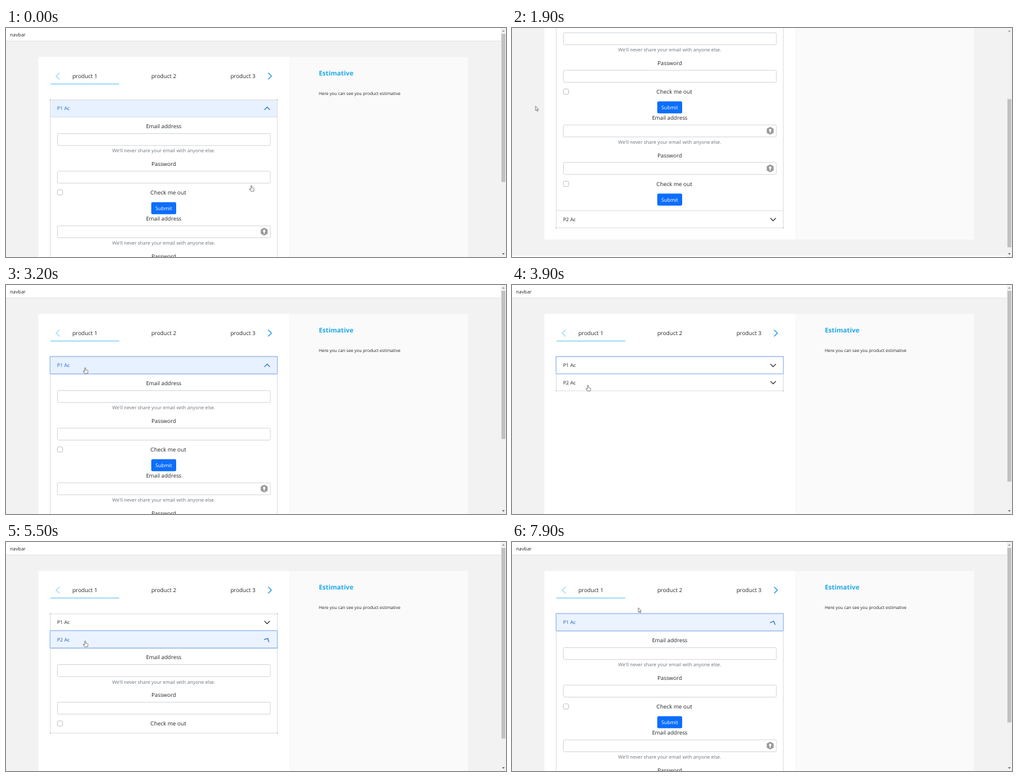
An HTML page with a canvas for the animation above (8000 ms loop, 764x352 px).

```html
<!DOCTYPE html>
<html lang="en">
<head>
<meta charset="utf-8">
<title>Product accordion</title>
<style>
html, body { margin: 0; width: 764px; height: 352px; overflow: hidden; background: #f2f2f2; }
canvas { display: block; }
</style>
</head>
<body>
<canvas id="stage" width="764" height="352"></canvas>
<script>
const ctx = document.getElementById('stage').getContext('2d');
const LOOP = 8000, STEP = 100, VIEW = 352;
const LEFT = 67.5, RIGHT = 414.5, MIDDLE = 241, TOP = 110, ROW = 26.4;
const BODY1 = 299.4, BODY2 = 158, FORM_GAP = 141.7;
const INK = '#212529', MUTED = '#6c757d', LINE = '#dfdfdf';

// Cursor tip: time, x, y
const cursorPath = [
  [500, 190, 153], [600, 164, 146], [1200, 30, 104], [1300, 30, 104], [1600, 36, 120],
  [1900, 36, 120], [2700, 39, 134], [3200, 121, 127], [3500, 121, 127], [3900, 116, 154],
  [4400, 115, 154], [5200, 115, 154], [5400, 121, 152], [6100, 121, 152], [6700, 243, 76],
  [7100, 243, 76], [7600, 180, 122], [7750, 180, 122], [7900, 193, 101]
];

const clamp = v => Math.min(1, Math.max(0, v));
const mix = (a, b, k) => a + (b - a) * k;
const smooth = p => p * p * (3 - 2 * p);
const easeOut = p => 1 - (1 - p) ** 3;

// CSS "ease": cubic-bezier(.25, .1, .25, 1)
function ease(p) {
  const bezier = (a, b, s) => 3 * a * s * (1 - s) ** 2 + 3 * b * s * s * (1 - s) + s ** 3;
  let low = 0, high = 1;
  for (let i = 0; i < 20; i++) {
    const mid = (low + high) / 2;
    if (bezier(.25, .25, mid) < p) low = mid; else high = mid;
  }
  return bezier(.1, 1, low);
}

const ramp = (t, start, duration, curve) => curve(clamp((t - start) / duration));
const mixColor = (a, b, k) => `rgb(${a.map((v, i) => Math.round(mix(v, b[i], k)))})`;

function rect(x, y, w, h, fill) {
  ctx.fillStyle = fill;
  ctx.fillRect(x, y, w, h);
}

function box(x, y, w, h, radius, fill, stroke) {
  ctx.beginPath();
  ctx.roundRect(x, y, w, h, radius);
  if (fill) { ctx.fillStyle = fill; ctx.fill(); }
  if (stroke) { ctx.strokeStyle = stroke; ctx.lineWidth = 1; ctx.stroke(); }
}

function text(str, x, y, size, color = INK, align = 'left', weight = 400) {
  ctx.font = `${weight} ${size}px "Open Sans", "Noto Sans", sans-serif`;
  ctx.textAlign = align;
  ctx.fillStyle = color;
  ctx.fillText(str, x, y + size * .36);
}

function polyline(points, stroke, width) {
  ctx.beginPath();
  points.forEach(([x, y]) => ctx.lineTo(x, y));
  ctx.strokeStyle = stroke;
  ctx.lineWidth = width;
  ctx.stroke();
}

function polygon(points, fill) {
  ctx.beginPath();
  points.forEach(([x, y]) => ctx.lineTo(x, y));
  ctx.closePath();
  ctx.fillStyle = fill;
  ctx.fill();
}

function at(x, y, angle, draw) {
  ctx.save();
  ctx.translate(x, y);
  ctx.rotate(angle);
  draw();
  ctx.restore();
}

function keyIcon(y) {
  at(394.5, y, 0, () => {
    polygon([[0, -6], [5.2, -3.2], [5.2, 3.2], [0, 6], [-5.2, 3.2], [-5.2, -3.2]], '#999');
    ctx.beginPath();
    ctx.arc(0, -1, 1.9, 0, 7);
    ctx.fillStyle = '#fff';
    ctx.fill();
    rect(-.7, 0, 1.4, 3.5, '#fff');
  });
}

function form(dy, withKeys) {
  const label = (str, y) => text(str, MIDDLE, y + dy, 8.35, INK, 'center');
  const field = y => {
    box(78.5, y - 9 + dy, 325.5, 18.4, 2, '#fff', '#d3d7db');
    if (withKeys) keyIcon(y + dy);
  };
  label('Email address', 151);
  field(171.3);
  text("We'll never share your email with anyone else.", MIDDLE, 188.7 + dy, 7.34, MUTED, 'center');
  label('Password', 209);
  field(229);
  box(78.5, 248.8 + dy, 8, 8, 2, '#fff', '#c4c4c4');
  text('Check me out', 248, 253 + dy, 8.5, INK, 'center');
  box(222, 267.7 + dy, 38, 18.6, 2, '#0d6efd');
  text('Submit', MIDDLE, 277.3 + dy, 7.7, '#fff', 'center');
}

function header(str, y, active) {
  const color = mixColor([33, 37, 41], [28, 105, 212], active);
  rect(LEFT, y, RIGHT - LEFT, ROW, mixColor([255, 255, 255], [231, 241, 255], active));
  text(str, 78, y + 13.4, 7.6, color);
  at(399, y + 13.6, -Math.PI * active, () => polyline([[-4.2, -2.2], [0, 2], [4.2, -2.2]], color, 1.1));
}

function accordionBody(y, height, draw) {
  if (height <= 0) return;
  ctx.save();
  ctx.beginPath();
  ctx.rect(LEFT, y, RIGHT - LEFT, height);
  ctx.clip();
  draw();
  ctx.restore();
  rect(LEFT, y, RIGHT - LEFT, 1, '#d3dce9');
}

function focusRing(y) {
  box(LEFT - .5, y - .5, RIGHT - LEFT + 1, ROW + 1, 1, null, 'rgba(13,110,253,.25)');
  box(LEFT, y, RIGHT - LEFT, ROW, 1, null, '#9dbff2');
}

function page(state) {
  const { open1, open2, active1, active2, focus, panelBottom, row2, bottom, height } = state;
  rect(0, 0, 756, height, '#f2f2f2');
  rect(0, 0, 756, 20, '#fff');
  rect(0, 19.5, 756, 1, '#e3e3e3');
  text('navbar', 6, 10.5, 7.4);

  rect(49.5, 44.5, 384, panelBottom - 44.5, '#fff');
  rect(433.5, 44.5, 272.5, panelBottom - 44.5, '#fafafa');
  text('Estimative', 478, 69.7, 10, '#1fa9ea', 'left', 700);
  text('Here you can see you product estimative', 478, 100.3, 6.58);

  polyline([[81.8, 69], [76.6, 74], [81.8, 79]], '#a3d9f5', 1.3);
  polyline([[400.5, 69], [405.7, 74], [400.5, 79]], '#2a9ce8', 1.3);
  [120.5, 241, 362].forEach((x, i) => text('product ' + (i + 1), x, 74.2, 8.5, INK, 'center'));
  rect(68, 85.5, 105, 1.2, '#6fcbee');

  header('P1 Ac', TOP, active1);
  accordionBody(TOP + ROW, BODY1 * open1, () => { form(0, false); form(FORM_GAP, true); });
  header('P2 Ac', row2, active2);
  accordionBody(row2 + ROW, BODY2 * open2, () => form(row2 + ROW - 136.6, false));
  rect(LEFT, row2 - .5, RIGHT - LEFT, 1, LINE);
  box(LEFT, TOP + .5, RIGHT - LEFT, bottom - TOP - .5, 1, null, LINE);
  for (const x of [LEFT, RIGHT]) for (const y of [TOP, bottom - .5]) rect(x - .5, y, 1, 1, '#777');
  if (focus) focusRing(focus === 1 ? TOP : row2);

  rect(0, height - 11, 756, 11, '#fff');
  text('footer', 6, height - 4.5, 7.4);
}

function scrollbar(scroll, height) {
  const track = 334, scale = track / height;
  rect(756, 0, 8, VIEW, '#f1f1f1');
  rect(757, 9 + scroll * scale, 6, VIEW * scale, '#c1c1c1');
  polygon([[758, 5.5], [760, 3.3], [762, 5.5]], '#8a8a8a');
  polygon([[758, 346.3], [760, 348.5], [762, 346.3]], '#505050');
}

function cursorAt(t) {
  if (t < 100) return { x: 375, y: 242, hand: true };
  if (t < 600) return null;
  const next = cursorPath.findIndex(key => key[0] >= t);
  const [t0, x0, y0] = cursorPath[next - 1], [t1, x1, y1] = cursorPath[next];
  const k = smooth((t - t0) / (t1 - t0));
  return { x: mix(x0, x1, k), y: mix(y0, y1, k) };
}

function drawCursor({ x, y, hand }) {
  const shape = hand
    ? 'M-.8 .6Q0-.6 .8 .6V3.6L3.6 4.3Q4.4 4.6 4.3 5.6L3.6 9H-.8L-3 5.9Q-3.2 4.8-2 5.2L-.8 6.2Z'
    : 'M0 0V7L1.6 5.6L2.7 8L3.7 7.5L2.6 5.2H4.6Z';
  at(x, y, 0, () => {
    const path = new Path2D(shape);
    ctx.fillStyle = '#fff';
    ctx.fill(path);
    ctx.strokeStyle = '#555';
    ctx.lineWidth = .7;
    ctx.stroke(path);
  });
}

function render(t) {
  const toggle1 = (duration, curve) => 1 - ramp(t, 3340, duration, curve) + ramp(t, 7745, duration, curve);
  const toggle2 = (duration, curve) => ramp(t, 4130, duration, curve) - ramp(t, 5450, duration, curve);
  const open1 = toggle1(350, ease), open2 = toggle2(350, ease);
  const row2 = TOP + ROW + BODY1 * open1;
  const bottom = row2 + ROW + BODY2 * open2;
  const panelBottom = Math.max(365, bottom + 18);
  const height = panelBottom + 36;
  const scroll = (height - VIEW) * (ramp(t, 1740, 260, easeOut) - ramp(t, 2540, 260, easeOut));
  const focus = t < 3200 ? 0 : t < 4100 || t >= 7700 ? 1 : 2;

  ctx.textRendering = 'geometricPrecision';
  ctx.save();
  ctx.translate(0, -Math.round(scroll));
  page({
    open1, open2, row2, bottom, panelBottom, height, focus,
    active1: toggle1(200, smooth), active2: toggle2(200, smooth)
  });
  ctx.restore();
  scrollbar(scroll, height);

  const cursor = cursorAt(t);
  if (!cursor) return;
  const { x, y } = cursor, docY = y + scroll;
  const onHeader = x > LEFT && x < RIGHT &&
    [TOP, row2].some(top => docY > top && docY < top + ROW);
  const onTab = x > 68 && x < RIGHT && docY > 62 && docY < 87;
  drawCursor({ x, y, hand: cursor.hand || onHeader || onTab });
}

const start = performance.now();
function tick() {
  const t = (performance.now() - start) % LOOP;
  render(Math.floor(t / STEP) * STEP);
  requestAnimationFrame(tick);
}
tick();
</script>
</body>
</html>
```
